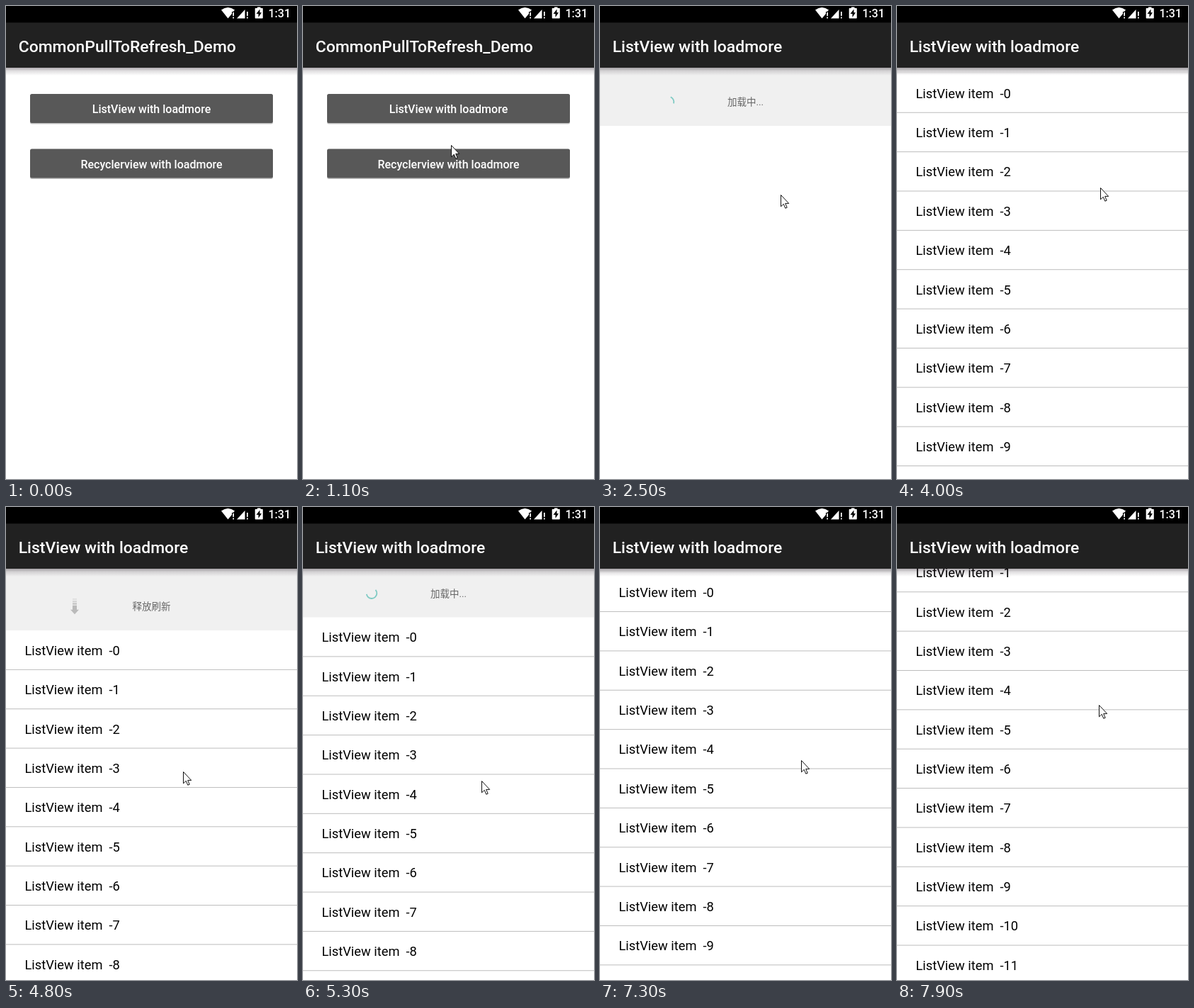
These frames come from a looping animation (411x667 px, 8000 ms). An HTML page:

```html
<!DOCTYPE html>
<html lang="zh-CN">
<head>
<meta charset="utf-8">
<title>Pull to refresh</title>
<style>
html, body { margin: 0; width: 100%; height: 100%; overflow: hidden; background: #fff; }
svg { display: block; width: 411px; height: 667px; }
text { font-family: Roboto, "Noto Sans CJK SC", "Noto Sans CJK", sans-serif; white-space: pre; }
.title { font-size: 22.9px; font-weight: 500; fill: #fff; }
.btn { font-size: 16px; font-weight: 500; fill: #fff; text-anchor: middle; }
.item { font-size: 18.3px; fill: #000; }
.hint { font-size: 13.5px; fill: #666; text-anchor: middle; }
.clock { font-size: 16px; font-weight: 500; }
</style>
</head>
<body>
<svg viewBox="0 0 411 667">
  <defs>
    <linearGradient id="shade" x1="0" y1="0" x2="0" y2="1">
      <stop offset="0" stop-color="#1c101c" stop-opacity=".36"/>
      <stop offset=".4" stop-color="#1c101c" stop-opacity=".14"/>
      <stop offset="1" stop-color="#1c101c" stop-opacity="0"/>
    </linearGradient>
    <g id="bar">
      <rect y="87" width="411" height="11" fill="url(#shade)"/>
      <rect y="23" width="411" height="64" fill="#212121"/>
    </g>
    <g id="button">
      <rect x="34" y="1" width="343" height="41.5" rx="2.5" fill="#000" opacity=".25"/>
      <rect x="34" width="343" height="41" rx="2.5"/>
    </g>
  </defs>

  <g id="menu">
    <rect width="411" height="667" fill="#fff"/>
    <use href="#bar"/>
    <text class="title" x="17.7" y="65">CommonPullToRefresh_Demo</text>
    <use href="#button" y="124" fill="#585858"/>
    <use id="pressed" href="#button" y="124" fill="#686868"/>
    <text class="btn" x="205.5" y="151">ListView with loadmore</text>
    <use href="#button" y="201.5" fill="#585858"/>
    <text class="btn" x="205.5" y="228.5">Recyclerview with loadmore</text>
  </g>

  <g id="page">
    <rect y="23" width="411" height="667" fill="#fff"/>
    <g id="scroll">
      <g id="head">
        <rect y="-120" width="411" height="120" fill="#f0f0f0"/>
        <text id="hint" class="hint" x="205.5" y="-28.6"></text>
        <g transform="translate(97 -33.8)">
          <circle id="spin" r="7.3" pathLength="360" fill="none" stroke="#80cbc4" stroke-width="1.8"/>
          <g id="arrow" fill="#bababa">
            <rect x="-3" y="-11" width="6" height="1.5" opacity=".4"/>
            <rect x="-3" y="-8" width="6" height="2" opacity=".55"/>
            <rect x="-3" y="-5" width="6" height="2.5" opacity=".75"/>
            <path d="M-3-1.5H3V4.5H6L0 11L-6 4.5H-3Z"/>
          </g>
        </g>
      </g>
      <g id="items"></g>
    </g>
    <use href="#bar"/>
    <text class="title" x="17.7" y="65">ListView with loadmore</text>
  </g>

  <g id="status" fill="#fff">
    <rect width="411" height="23.4" fill="#000"/>
    <path d="M304 5.5Q313.5-1.5 323 5.5L321 8H319V11L313.5 17.5Z"/>
    <path d="M326 17.5L337.5 5V17.5Z"/>
    <path d="M320.300 9h1.700v5h-1.700zM320.300 15.500h1.700v2h-1.700zM340 8h1.700v6h-1.700zM340 15.500h1.700v2h-1.700z"/>
    <path d="M355 1.500h4.500v1.500h2.500q.8 0 .8.800v13q0 .8-.8.800h-9.500q-.8 0-.8-.8v-13q0-.8.8-.8h2.500z"/>
    <path d="M358.500 4.500L353.500 11H356.500V16L361 9.300H358.500Z" fill="#000"/>
    <text class="clock" x="370.500" y="15.600">1:31</text>
  </g>

  <path id="cursor" d="M.5.500V16.800L4.300 13.300L6.800 19.200L9.200 18.200L6.700 12.400H11.700Z"
    fill="#fff" stroke="#111" stroke-width="1"/>
</svg>
<script>
const LOOP = 8000, STEP = 100, TOP = 87, ROW = 55.36;
const OPEN = 2050, LOADED = 3600, GRAB = 4280, RELEASE = 5070, DONE = 6910, DRAG = 7450;
const AUTO = 82, KEEP = 68.5;
const $ = id => document.getElementById(id);
const clamp = x => Math.min(1, Math.max(0, x));
const part = (t, from, span) => clamp((t - from) / span);
const smooth = x => x * x * (3 - 2 * x);
const show = (id, on) => $(id).setAttribute('visibility', on ? 'inherit' : 'hidden');
const move = (id, x, y) => $(id).setAttribute('transform', `translate(${x} ${y})`);

// Pointer path: time, x, y
const path = [
  [100, 404, 71], [600, 180, 291], [700, 180, 291], [1400, 228, 135],
  [1600, 228, 135], [1800, 228, 147], [2000, 228, 147], [2500, 255, 266],
  [3400, 287, 256], [4000, 287, 256], [GRAB, 276, 228], [4800, 250, 373],
  [RELEASE, 252, 386], [5300, 252, 386], [6100, 279, 349], [6950, 279, 349],
  [7350, 284, 357], [DRAG, 284, 357], [7900, 285, 279], [LOOP, 285, 279]
];

$('items').innerHTML = Array.from({ length: 14 }, (_, i) =>
  `<text class="item" x="26.5" y="${i * ROW + 34.8}">ListView item  -${i}</text>` +
  `<rect y="${(i + 1) * ROW - .5}" width="411" height="1" fill="#bdbdbd"/>`).join('');

function pointer(t) {
  const i = Math.max(1, path.findIndex(p => p[0] >= t));
  const [t0, x0, y0] = path[i - 1], [t1, x1, y1] = path[i];
  const k = smooth(part(t, t0, t1 - t0));
  return [x0 + (x1 - x0) * k, y0 + (y1 - y0) * k];
}

// Scroller easing: short ramp, then exponential settling
function settle(x) {
  x *= 8;
  return x < 1 ? x - 1 + Math.exp(-x) : 1 - .632 * Math.exp(1 - x);
}

const pull = y => .7 + (y - 228) / 1.68;

function offset(t, y) {
  if (t < LOADED + 40) return AUTO * settle(part(t, 2250, 200));
  if (t < GRAB) return AUTO * (1 - settle(part(t, LOADED + 40, 1000)));
  if (t < RELEASE) return pull(y);
  if (t < DONE) {
    const from = pull(386);
    return from + (KEEP - from) * settle(part(t, RELEASE, 200));
  }
  const drag = t > DRAG ? y - 357 : 0;
  return KEEP * (1 - settle(part(t, DONE, 1000))) + drag;
}

function hintFor(t, o) {
  if (t < LOADED || t >= RELEASE && t < DONE) return '加载中...';
  if (t < GRAB || t >= DONE) return '更新完成';
  return o < AUTO ? '下拉刷新' : '释放刷新';
}

// Indeterminate ring: the end runs ahead, then the start catches up
function spinner(t) {
  const turns = Math.max(0, t - (t < RELEASE - 100 ? 2317 : 4967)) / 1333;
  const n = Math.floor(turns), p = turns - n;
  const ease = x => 1 - (1 - clamp(x) ** 2.2) ** 6;
  const tail = 270 * ease(2 * p - 1), tip = 270 * ease(2 * p) + 4;
  const start = 144 * n + 234 * p + tail - 100;
  $('spin').setAttribute('transform', `rotate(${start})`);
  $('spin').setAttribute('stroke-dasharray', `${tip - tail} 360`);
}

function draw(t) {
  const [x, y] = pointer(t);
  const o = offset(t, y), hint = hintFor(t, o);
  const loading = hint[0] === '加', pulling = t >= GRAB && t < RELEASE;

  show('cursor', t >= 100);
  move('cursor', Math.round(x), Math.round(y));
  $('pressed').setAttribute('opacity', part(t, 1700, 200));

  show('page', t >= OPEN);
  $('page').setAttribute('opacity', part(t, OPEN, 200));
  move('page', 0, 53 * (1 - part(t, OPEN, 350)) ** 5);

  move('scroll', 0, TOP + o);
  show('head', o > 0);
  show('items', t >= LOADED);
  $('hint').textContent = hint;
  show('spin', loading && o > 0);
  show('arrow', pulling && o > 0);
  $('arrow').setAttribute('transform', `rotate(${-180 * part(t, 4800, 150)})`);
  spinner(t);
}

function tick(now) {
  draw(Math.floor(now % LOOP / STEP) * STEP);
  requestAnimationFrame(tick);
}
draw(0);
requestAnimationFrame(tick);
</script>
</body>
</html>
```
